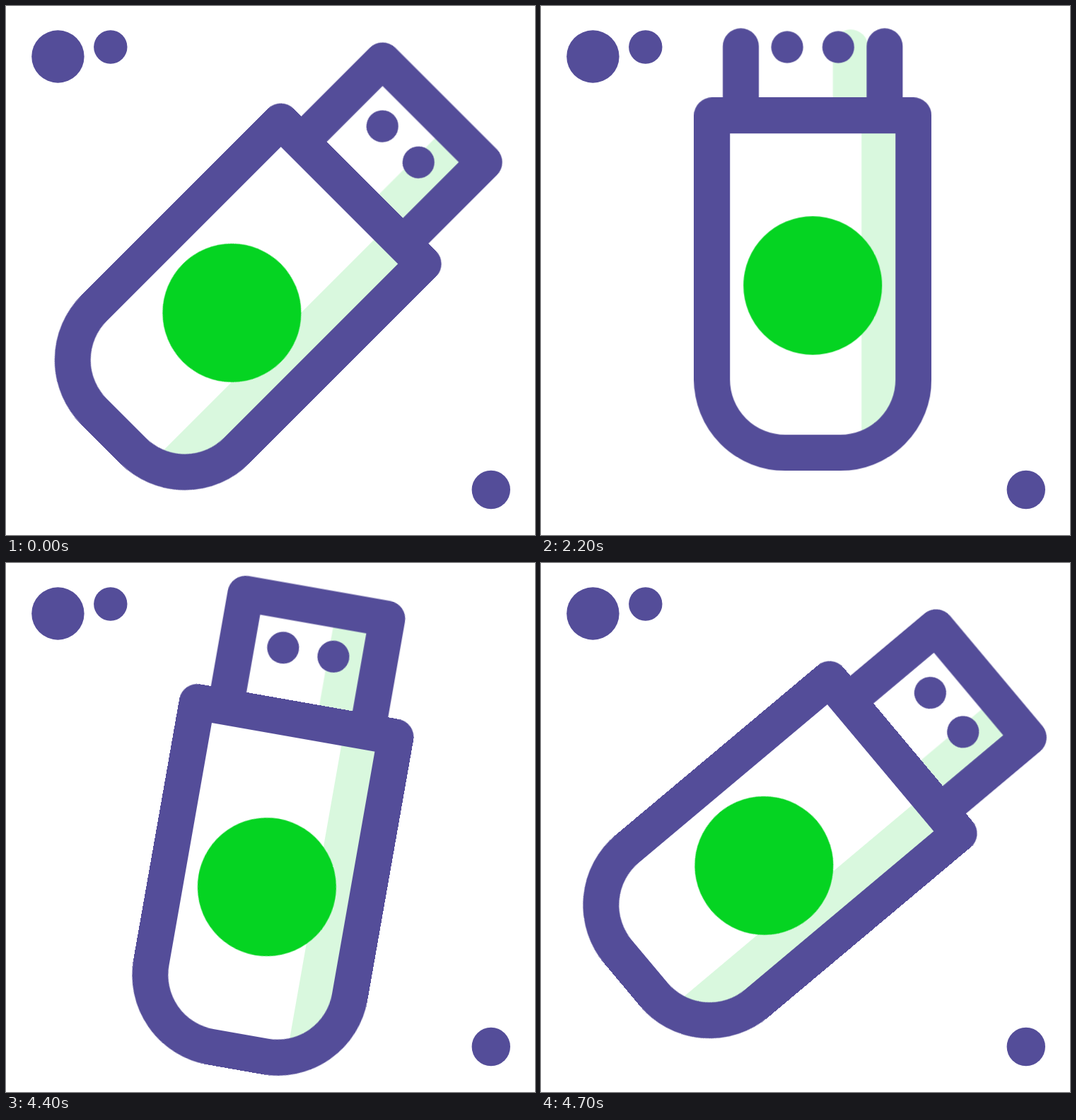
Write an HTML page that moves like this. It is 748 px wide and 748 px high and loops after 4.8 s.

```html
<!DOCTYPE html>
<html lang="en">
<head>
<meta charset="utf-8">
<title>Flash drive</title>
<style>
  html, body { margin: 0; width: 100%; height: 100%; overflow: hidden; background: #fff; }
  svg { display: block; width: 100%; height: 100%; }
  .ink { fill: #544d99; }
  .line { fill: none; stroke: #544d99; stroke-width: 51; stroke-linejoin: round; stroke-linecap: round; }
  .shade { fill: #d9f8de; }
  .badge { fill: #05d422; }
</style>
</head>
<body>
<svg viewBox="0 0 748 748">
  <g id="bubbles" class="ink">
    <circle cx="73.4" cy="71.5" r="37.2"/>
    <circle cx="147.8" cy="58" r="23.7"/>
    <circle cx="685.8" cy="684" r="27.2"/>
  </g>
  <!-- The drive is drawn upright around the centre of its case. -->
  <g id="drive">
    <g id="plug">
      <path class="shade" d="M28.5-401H102V-245H28.5Z"/>
      <path class="line" d="M-101.7-245V-401H101.7V-245"/>
    </g>
    <g id="stub">
      <path class="shade" d="M28.5-245V-335a25 25 0 0 1 50 0V-245Z"/>
      <path class="line" d="M-101.7-245V-336.2M101.7-245V-336.2"/>
    </g>
    <g id="contacts" class="ink">
      <circle cx="-36.1" cy="-335.1" r="22.6"/>
      <circle cx="36.1" cy="-335.1" r="22.6"/>
    </g>
    <path class="shade" d="M69-238.5H142.5V135A103.5 103.5 0 0 1 69 234Z"/>
    <path class="line" d="M-142.5-238.5H142.5V135A103.5 103.5 0 0 1 39 238.5H-39A103.5 103.5 0 0 1-142.5 135Z"/>
    <circle class="badge" cy="2" r="98"/>
  </g>
</svg>
<script>
const LOOP = 4800;

// Poses: case centre x, y, tilt in degrees, state of the plug
const rest = [320.8, 432.5, 45, 'plug'];
const lean = [346.7, 450.4, 25, 'plug'];
const nod = [369.2, 456.1, 10, 'plug'];
const upright = [384.2, 393.2, 0, 'stub'];
const closed = [384.2, 295, 0, 'none'];
const overshoot = [316.9, 426.6, 50, 'plug'];

const timeline = [
  [0, rest], [2000, lean], [2100, nod], [2200, upright], [2300, closed],
  [4300, upright], [4400, nod], [4500, lean], [4600, rest], [4700, overshoot]
];

// Holds each pose until the next one begins.
function play(id, style) {
  const frames = timeline.map(([time, pose]) =>
    ({ offset: time / LOOP, easing: 'step-end', ...style(pose) }));
  frames.push({ ...frames.at(-1), offset: 1 });
  document.getElementById(id).animate(frames, { duration: LOOP, iterations: Infinity });
}

const showWhen = test => ([, , , state]) => ({ opacity: test(state) ? 1 : 0 });

play('drive', ([x, y, tilt]) => ({ transform: `translate(${x}px, ${y}px) rotate(${tilt}deg)` }));
play('plug', showWhen(state => state === 'plug'));
play('stub', showWhen(state => state === 'stub'));
play('contacts', showWhen(state => state !== 'none'));
play('bubbles', pose => ({ transform: `translateY(${pose === closed ? -1 : 0}px)` }));
</script>
</body>
</html>
```
